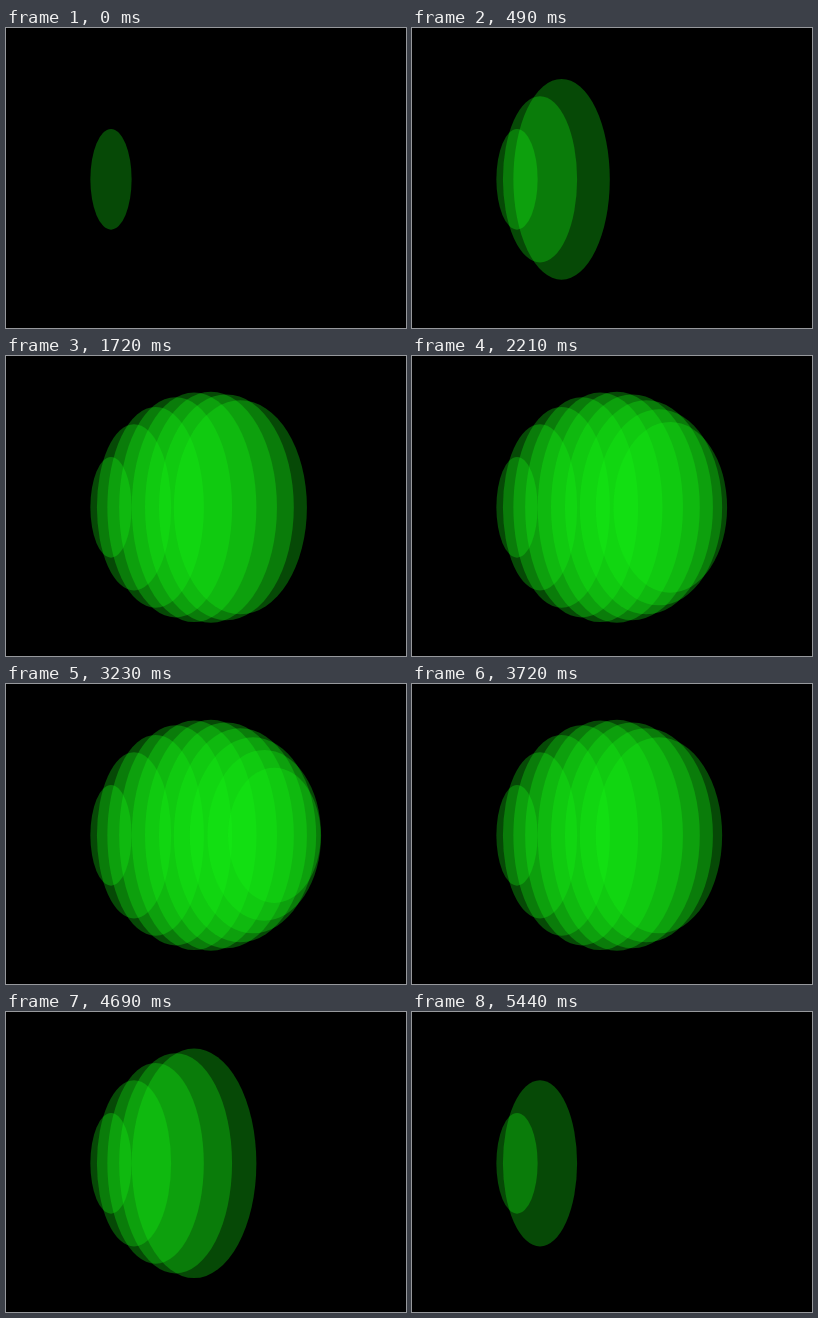
These frames come from a looping animation (400x300 px, 5.67 s). An HTML page with a canvas:

```html
<!DOCTYPE html>
<html>
<head>
<meta charset="utf-8">
<style>
  html, body { margin: 0; height: 100%; overflow: hidden; background: #000; }
  canvas { display: block; }
</style>
</head>
<body>
<canvas id="stage" width="400" height="300"></canvas>
<script>
const ctx = document.getElementById('stage').getContext('2d');
const LOOP = 5670, STEP = 245, FALL_END = 5665;
const SLICES = 12;

// A sphere cut into parallel discs, seen in perspective; lengths in slice spacings
const RADIUS = 5.975, DISTANCE = 25.5, FOCAL = 480;
const TURN = 35 * Math.PI / 180;
const CENTER_X = 200, CENTER_Y = 151.3;

function drawSlice(index) {
  const sin = Math.sin(TURN), cos = Math.cos(TURN);
  const offset = index - (SLICES - 1) / 2;
  const r = Math.sqrt(RADIUS ** 2 - offset ** 2);
  const depth = DISTANCE + offset * sin;
  const left = FOCAL * (offset * cos - r * sin) / (depth + r * cos);
  const right = FOCAL * (offset * cos + r * sin) / (depth - r * cos);
  const halfHeight = FOCAL * r / Math.sqrt(depth ** 2 - (r * cos) ** 2);
  ctx.beginPath();
  ctx.ellipse(CENTER_X + (left + right) / 2, CENTER_Y,
    (right - left) / 2, halfHeight, 0, 0, 2 * Math.PI);
  ctx.fill();
}

function draw(time) {
  // Slices pile up one by one, rest, then go in reverse order
  const rising = Math.floor(time / STEP);
  const falling = Math.ceil((FALL_END - time) / STEP);
  const last = Math.min(SLICES - 1, rising, falling);
  ctx.fillStyle = '#000';
  ctx.fillRect(0, 0, 400, 300);
  ctx.fillStyle = 'rgba(20, 240, 20, 0.3)';
  for (let i = 0; i <= last; i++) drawSlice(i);
}

const start = performance.now();
function tick() {
  draw((performance.now() - start) % LOOP);
  requestAnimationFrame(tick);
}
tick();
</script>
</body>
</html>
```
